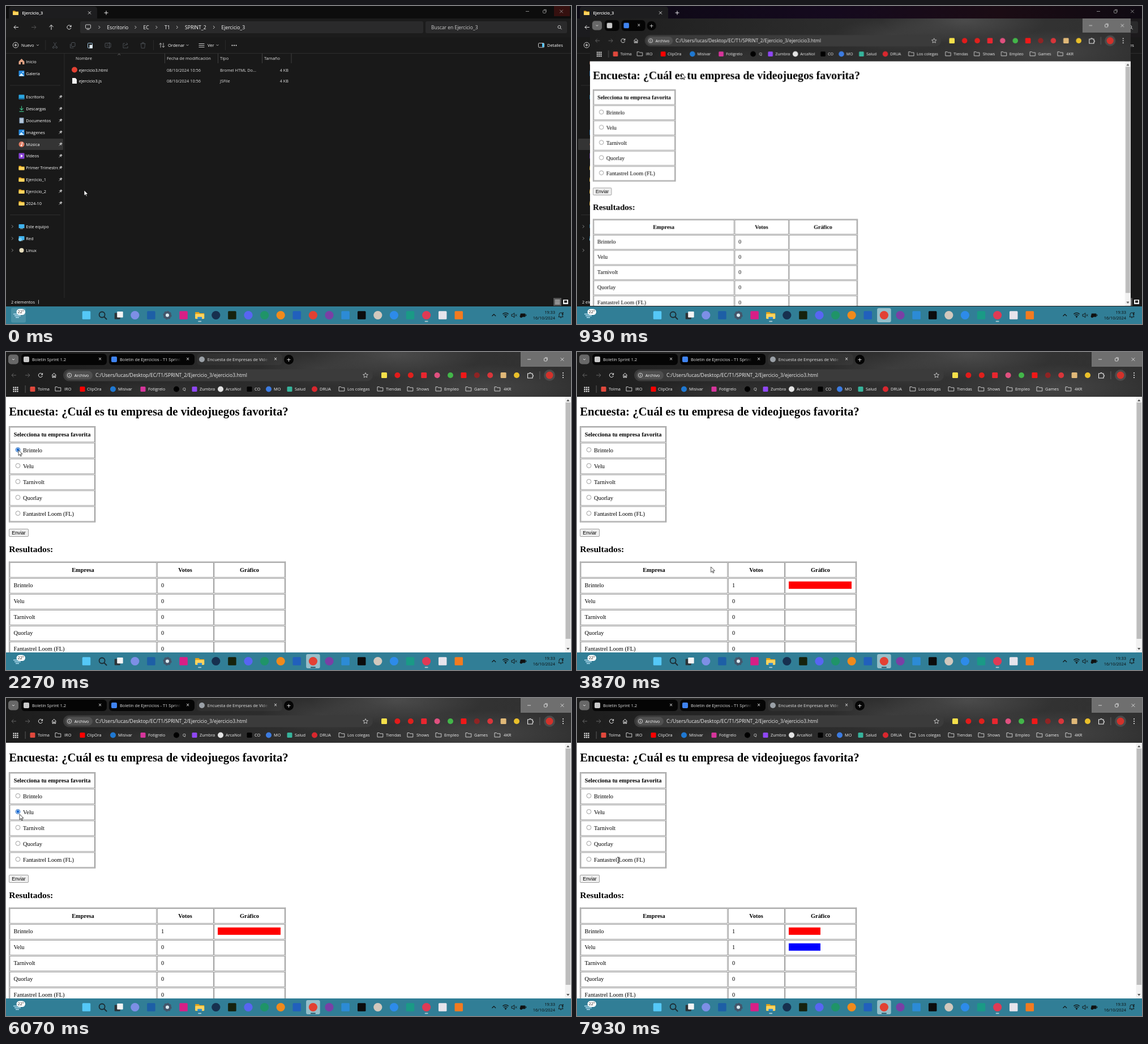
An HTML page that plays this animation: 998x561 px, repeating every 8 s.

```html
<!DOCTYPE html>
<html lang="es">
<head>
<meta charset="utf-8">
<title>Encuesta</title>
<style>
html, body { margin: 0; width: 100%; height: 100%; overflow: hidden; background: #191919; }
body { position: relative; font-family: "Open Sans", "Noto Sans", sans-serif; }
svg, #win, #strip { position: absolute; left: 0; top: 0; }
svg { width: 998px; height: 561px; overflow: hidden; white-space: pre; }
.serif { font-family: "Liberation Serif", "Times New Roman", serif; }
.arial { font-family: "Liberation Sans", Arial, sans-serif; }

#win {
  width: 998px; height: 530px; overflow: hidden; transform-origin: 0 0;
  background:
    radial-gradient(ellipse 150px 42px at 690px 4px, #5a5a5a99, #0000),
    radial-gradient(ellipse 170px 40px at 850px 62px, #55555588, #0000),
    radial-gradient(ellipse 110px 30px at 560px 30px, #4a4a4a88, #0000),
    radial-gradient(ellipse 160px 30px at 260px 72px, #40404077, #0000),
    linear-gradient(90deg, #1d1d1d, #292929 35%, #343434 70%, #303030);
  animation: open 8s linear infinite;
}
#strip { left: 27px; top: 3px; height: 20px; display: flex; color: #e3e3e3; font-size: 7.5px; line-height: 20px; }
.tab { position: relative; width: 155px; height: 20px; overflow: hidden; white-space: nowrap; animation: 8s linear infinite; }
.tab::before { content: ""; position: absolute; inset: 0 4px 0 0; border-radius: 6px; background: #050505; }
.tab:nth-child(3)::before { background: #ffffff08; }
.tab i { position: absolute; left: 4px; top: 5px; width: 10px; height: 10px; border-radius: 2px; }
.tab span { position: absolute; left: 19px; width: 108px; overflow: hidden; -webkit-mask: linear-gradient(90deg, #000 88%, #0000); }
.tab b { position: absolute; right: 13px; font: 10px/19px "Open Sans", sans-serif; }
.tab:nth-child(1) { animation-name: tab1; }
.tab:nth-child(2) { animation-name: tab2; }
.tab:nth-child(3) { animation-name: tab3; }
.tab span, .tab:nth-child(1) b { animation: label 8s linear infinite; }
.plus { width: 17px; height: 17px; margin: 1.5px 0 0 -1px; border-radius: 9px; background: #050505; text-align: center; font: 13px/16px "Open Sans", sans-serif; }

.step { animation: 8s step-end infinite; }
.hov { animation-name: hov; } .sel { animation-name: sel; } .idle { animation-name: idle; }
.focus1 { animation-name: focus1; } .focus2 { animation-name: focus2; } .line2 { animation-name: line2; }
.pick1 { animation-name: pick1; } .pick2 { animation-name: pick2; }
.on1 { animation-name: on1; } .off1 { animation-name: off1; }
.on2 { animation-name: on2; } .off2 { animation-name: off2; }
.press { animation-name: press; } .half { animation-name: half; }
.arrow { animation-name: arrow; } .beam { animation-name: beam; }
.fade { animation: fade 8s linear infinite; }
#ptr { animation: move 8s linear infinite; }

@keyframes fade { 0%, .9% { opacity: 1 } 4.5%, 100% { opacity: 0 } }
@keyframes hov { 0% { opacity: 0 } 5.5%, 100% { opacity: 1 } }
@keyframes sel { 0% { opacity: 0 } 8.3%, 100% { opacity: 1 } }
@keyframes idle { 0% { opacity: 1 } 8.3%, 100% { opacity: 0 } }
@keyframes focus1 { 0% { opacity: 0 } 8.3% { opacity: 1 } 11.56%, 100% { opacity: 0 } }
@keyframes focus2 { 0% { opacity: 0 } 11.56%, 100% { opacity: 1 } }
@keyframes line2 { 0% { opacity: 0 } 19.1%, 100% { opacity: 1 } }
@keyframes pick1 { 0% { opacity: 0 } 27.4% { opacity: 1 } 37.4%, 100% { opacity: 0 } }
@keyframes pick2 { 0% { opacity: 0 } 74.1% { opacity: 1 } 82%, 100% { opacity: 0 } }
@keyframes on1 { 0% { opacity: 0 } 37.4%, 100% { opacity: 1 } }
@keyframes off1 { 0% { opacity: 1 } 37.4%, 100% { opacity: 0 } }
@keyframes on2 { 0% { opacity: 0 } 82%, 100% { opacity: 1 } }
@keyframes off2 { 0% { opacity: 1 } 82%, 100% { opacity: 0 } }
@keyframes half { 0% { width: 111px } 82%, 100% { width: 56px } }
@keyframes press { 0% { opacity: 0 } 35.8% { opacity: 1 } 43.2% { opacity: 0 } 80.8% { opacity: 1 } 83.6%, 100% { opacity: 0 } }
@keyframes arrow { 0% { opacity: 1 } 98.2%, 100% { opacity: 0 } }
@keyframes beam { 0% { opacity: 0 } 98.2%, 100% { opacity: 1 } }
@keyframes open {
  0%, 11.55% { opacity: 0; transform: translate(23px, 22px) scale(.957) }
  11.56%, 12.2% { opacity: 1; transform: translate(23px, 22px) scale(.957) }
  13% { transform: translate(7px, 6.7px) scale(.987) }
  14.1%, 100% { opacity: 1; transform: translate(0, 0) scale(1) }
}
@keyframes tab1 { 0%, 12.2% { width: 31px } 15%, 100% { width: 155px } }
@keyframes tab2 { 0%, 12.2% { width: 48px } 15%, 100% { width: 155px } }
@keyframes tab3 { 0%, 12.2% { width: 0 } 15%, 100% { width: 155px } }
@keyframes label { 0%, 12.2% { opacity: 0 } 14%, 100% { opacity: 1 } }
@keyframes move {
  0%, .875% { transform: translate(138px, 325px) }
  5.8%, 12.5% { transform: translate(185px, 119px) }
  18.3% { transform: translate(62px, 190px) }
  23.7% { transform: translate(24px, 178px) }
  26.6%, 30% { transform: translate(22px, 173px) }
  36.3%, 40% { transform: translate(20px, 317px) }
  41.6%, 42.6% { transform: translate(40px, 318px) }
  48.3%, 48.6% { transform: translate(236.5px, 379px) }
  53.4% { transform: translate(290px, 420px) }
  58.7% { transform: translate(294px, 398px) }
  64.1% { transform: translate(253px, 364px) }
  73.7%, 76.6% { transform: translate(24px, 205px) }
  81.2%, 83% { transform: translate(26px, 318px) }
  85.9% { transform: translate(160px, 320px) }
  91.2% { transform: translate(294px, 444px) }
  96.6% { transform: translate(162px, 321px) }
  99.1%, 100% { transform: translate(73px, 286px) }
}
</style>
</head>
<body>
<svg id="desk"></svg>
<div id="win">
  <svg id="page"></svg>
  <div id="strip">
    <div class="tab"><i style="background:#c9c9c9"></i><span>Boletín Sprint 1.2</span><b>×</b></div>
    <div class="tab"><i style="background:#3f83f0"></i><span>Boletín de Ejercicios - T1 Sprint 1</span><b>×</b></div>
    <div class="tab"><i style="background:#9aa0a6;border-radius:5px"></i><span>Encuesta de Empresas de Videojuegos</span><b>×</b></div>
    <div class="plus">+</div>
  </div>
</div>
<svg id="bar"></svg>
<svg id="top"><g id="ptr">
  <path class="step arrow" d="M0 0V9.6L2.3 7.5L3.8 11L5.3 10.4L3.8 7H7Z" fill="#fff" stroke="#000" stroke-width=".7"/>
  <path class="step beam" d="M-2-5H-.6L0-4.4L.6-5H2M0-4.4V4.4M-2 5H-.6L0 4.4L.6 5H2" fill="none" stroke="#000" stroke-width="1"/>
</g></svg>
<script>
// y is the optical middle of the line
const text = (x, y, s, size = 7.5, fill = '#fff', attr = '') =>
  `<text x="${x}" y="${y + size * .35}" font-size="${size}" fill="${fill}" ${attr}>${s}</text>`;
const box = (x, y, w, h, fill, attr = '') =>
  `<rect x="${x}" y="${y}" width="${w}" height="${h}" fill="${fill}" ${attr}/>`;
const disc = (x, y, r, fill, attr = '') => `<circle cx="${x}" cy="${y}" r="${r}" fill="${fill}" ${attr}/>`;
const line = (d, stroke = '#fff', w = .9) => `<path d="${d}" fill="none" stroke="${stroke}" stroke-width="${w}"/>`;
const step = (name, body) => `<g class="step ${name}">${body}</g>`;
const at = (x, y, body) => `<g transform="translate(${x} ${y})">${body}</g>`;
const square = (x, y, s, fill, attr = 'rx="1.5"') => box(x - s / 2, y - s / 2, s, s, fill, attr);
const put = (id, parts) => document.getElementById(id).innerHTML = parts.join('');
const MID = 'text-anchor="middle"', END = 'text-anchor="end"', BOLD = 'font-weight="bold"';

const folder = (x, y, k = 1) => at(x, y, `<g transform="scale(${k})">` +
  `<path d="M-5-3.5H-1L0-2.2H5V3.8H-5Z" fill="#e3a21a"/>` + box(-5, -1.4, 10, 5.4, '#ffd45e', 'rx=".8"') + '</g>');
const chevron = (x, y, c = '#ddd') => line(`M${x - 1.5} ${y - 2.5}l2.5 2.5l-2.5 2.5`, c);
const down = (x, y, c = '#ccc') => line(`M${x - 2} ${y - 1}l2 2l2-2`, c, .8);
const cross = (x, y, r, c = '#fff') => line(`M${x - r} ${y - r}l${2 * r} ${2 * r}m0 ${-2 * r}l${-2 * r} ${2 * r}`, c, .8);
const arrowH = (x, y, dir, c = '#fff') => line(`M${x - 4 * dir} ${y}h${8 * dir}m${-3.4 * dir}-3.4l${3.4 * dir} 3.4l${-3.4 * dir} 3.4`, c);
const reload = (x, y) => line(`M${x + 3.4} ${y - 1}a3.6 3.6 0 1 0 0 2M${x + 3.6} ${y - 3.8}v2.8h-2.8`);
const lens = (x, y, r, c, w) => disc(x, y, r, 'none', `stroke="${c}" stroke-width="${w}"`) +
  line(`M${x + r * .7} ${y + r * .7}l${r} ${r}`, c, w);
const winButtons = (xs, y, c) => line(`M${xs[0] - 3} ${y}h6`, c, .8) +
  box(xs[1] - 2.5, y - 2, 5, 5, 'none', `rx="1" stroke="${c}" stroke-width=".8"`) +
  line(`M${xs[1] - 1} ${y - 3.2}h4.2v4.4`, c, .7) + cross(xs[2], y, 2.8, c);

// file manager
const tools = c => [
  line('M84 64l5 8M89 64l-5 8', c), disc(83.8, 73, 1.5, 'none', `stroke="${c}"`), disc(89.2, 73, 1.5, 'none', `stroke="${c}"`),
  box(115.5, 64.5, 6.5, 7, 'none', `rx="1.2" stroke="${c}"`), line('M113.5 67v7h6', c),
  box(144.5, 65.5, 8, 8.5, 'none', `rx="1" stroke="${c}"`), box(147.5, 68.5, 5.5, 6, c, 'rx=".6"'),
  box(175, 65.5, 10, 7.5, 'none', `rx="1" stroke="${c}"`), text(177, 69.2, 'A', 6, c), line('M182.5 64v11', c),
  line('M210 66h-3v8h8v-3M209 71q1-4 6-4m-2.4-2.4l2.4 2.4l-2.4 2.4', c),
  line('M237.5 66.5h9M240.5 66v-1.6h3V66M238.5 67l.7 7.3h5.6l.7-7.3', c)
].join('');

const places = [
  ['Inicio', 98], ['Galería', 119], ['Escritorio', 160.5], ['Descargas', 181.5], ['Documentos', 202], ['Imágenes', 223],
  ['Música', 244], ['Vídeos', 264.5], ['Primer Trimestre', 285.5], ['Ejercicio_1', 306], ['Ejercicio_2', 327],
  ['2024-10', 348], ['Este equipo', 389], ['Red', 410], ['Linux', 431]
];
const photo = y => box(22.5, y - 5, 10, 10, '#2689dd', 'rx="1"') + `<path d="M23 ${y + 4.5}l4-5l5 5Z" fill="#d9efff"/>` + disc(30, y - 2, 1, '#fff');
const screen = y => box(22.5, y - 4, 10, 7, '#3fb2ee', 'rx=".8"') + box(25, y + 3.4, 5, 1, '#9bb');
const placeIcon = (i, y) => [
  () => `<path d="M22.5 ${y}l5-5l5 5v5h-3.5v-4h-3v4H22.5Z" fill="#e2a283"/>`,
  () => photo(y),
  () => box(22.5, y - 4, 10, 8, '#2aa5e0', 'rx="1"') + box(22.5, y + 2, 10, 2, '#176a9c'),
  () => line(`M27.5 ${y - 5}v7m-3-3l3 3l3-3M23.5 ${y + 4.6}h8`, '#3fc48c', 1.1),
  () => box(23.5, y - 5, 8, 10, '#8fa9c4', 'rx="1"') + line(`M25 ${y - 2}h5m-5 2.2h5m-5 2.2h5`, '#fff', .8),
  () => photo(y),
  () => disc(27.5, y, 5, '#df7b62') + line(`M28 ${y + 2}v-5l2 1`, '#fff') + disc(27, y + 2, 1.2, '#fff'),
  () => box(22.5, y - 5, 10, 10, '#8b45d8', 'rx="1"') + `<path d="M26 ${y - 2.4}l4 2.4l-4 2.4Z" fill="#fff"/>`,
  ...Array(4).fill(() => folder(27.5, y)),
  () => screen(y),
  () => screen(y) + disc(25, y + 2, 3, '#7fd0f5'),
  () => disc(27.5, y, 4, '#e6dcbc')
][i]();
const pin = y => at(96, y, '<g transform="rotate(45)">' + box(-1.6, -3.4, 3.2, 3.4, '#b5b5b5') + line('M-2.6.2h5.2M0 0v3.6', '#b5b5b5', .9) + '</g>');

put('desk', [
  '<defs><linearGradient id="tint"><stop stop-color="#0c0914"/><stop offset=".45" stop-color="#150a1e"/><stop offset=".75" stop-color="#1b0c14"/><stop offset="1" stop-color="#0f0a12"/></linearGradient>',
  '<linearGradient id="nav"><stop stop-color="#1b1b1e"/><stop offset=".6" stop-color="#1e1a20"/><stop offset="1" stop-color="#1c1a1c"/></linearGradient>',
  '<clipPath id="cut"><path d="M0 84H91.5V515H0Z"/></clipPath></defs>',
  box(0, 0, 998, 530, '#191919'), box(0, 0, 998, 22, '#0d0d0d'), box(0, 22, 998, 33, '#1c1c1c'),
  step('sel', box(0, 0, 998, 22, 'url(#tint)') + box(0, 22, 998, 33, 'url(#nav)')),
  `<g class="fade">${box(968, 0, 28, 18, '#35100f')}</g>`,
  '<path d="M5 22V6Q5 1 10 1H156Q161 1 161 6V22Z" fill="#1d1d1f"/>',
  folder(17, 12), text(28.5, 12, 'Ejercicio_3', 7.4, '#fff', 'font-weight="600"'), cross(147.5, 12, 2.5), line('M173.5 12h7m-3.5-3.5v7'),
  winButtons([921, 951, 981], 9.5, '#a5a5a5'),
  box(131, 27, 606, 21, '#2a2a2b', 'rx="2.5"'), box(741, 27, 250, 21, '#2a2a2b', 'rx="2.5"'),
  arrowH(18, 37.5, -1), arrowH(49, 37.5, 1, '#5a5a5a'),
  line('M80 42v-8.5m-3.6 3.6l3.6-3.6l3.6 3.6'), reload(111.5, 37.5),
  box(140.5, 33, 9, 6.5, 'none', 'rx="1" stroke="#ddd" stroke-width=".9"'), line('M142.5 41.5h5', '#ddd'),
  ...[165, 229, 266, 302.5, 367.5].map(x => chevron(x, 37.5)),
  ...[[178.5, 'Escritorio'], [242.5, 'EC'], [280, 'T1'], [316, 'SPRINT_2'], [380.5, 'Ejercicio_3']].map(([x, s]) => text(x, 37.5, s, 8.6)),
  text(751, 38, 'Buscar en Ejercicio_3', 8.5, '#d0d0d0'), lens(977.3, 37, 2.5, '#ddd', .9),
  box(0, 83, 998, .8, '#333'),
  disc(17, 69, 4.8, 'none', 'stroke="#ddd" stroke-width=".9"'), line('M14.5 69h5m-2.5-2.5v5'),
  text(27, 69.2, 'Nuevo', 7.5), down(56, 69), box(69.5, 60, .7, 18, '#333'), box(260, 60, .7, 18, '#333'), box(387, 60, .7, 18, '#333'),
  step('idle', tools('#4e5358') + `<g>${box(144.5, 65.5, 8, 8.5, '#191919', 'rx="1" stroke="#9cc3de"')}${box(147.5, 68.5, 5.5, 6, '#dfe9f0')}</g>`),
  step('sel', tools('#b9cbd8')),
  line('M273 73.5v-8m-2.4 2.4l2.4-2.4l2.4 2.4M278 65v8m-2.4-2.4l2.4 2.4l2.4-2.4', '#ddd', .8),
  text(286, 69.2, 'Ordenar', 7.5), down(320.5, 69), line('M340.5 66.5h10m-10 3h10m-10 3h10', '#ddd'), text(356, 69.2, 'Ver', 7.5), down(373.5, 69),
  ...[399.5, 403, 406.5].map(x => disc(x, 69.5, 1, '#fff')),
  box(940.5, 65.5, 10, 7.5, 'none', 'rx="1.2" stroke="#ddd" stroke-width=".9"'), box(947, 66, 3.3, 6.5, '#4cc2ff'), text(956, 69.2, 'Detalles', 7.4),
  box(102.6, 84, .8, 431, '#303030'), box(7, 139.6, 89, .8, '#333'), box(7, 368, 89, .8, '#333'),
  box(2, 234, 99, 20, '#343434', 'rx="1.5"'),
  `<g clip-path="url(#cut)">${places.map(([s, y]) => text(35.3, y + .3, s, 7.4)).join('')}</g>`,
  ...places.map(([, y], i) => placeIcon(i, y) + (i > 1 && i < 12 ? pin(y) : '') + (i > 11 ? chevron(11.5, y, '#999') : '')),
  ...[280, 374, 452, 503.6].map(x => box(x, 84, .8, 17, '#4a4a4a')), line('M197.5 86.5l2.3-2l2.3 2', '#999', .7),
  ...[[123, 'Nombre'], [284, 'Fecha de modificación'], [378, 'Tipo'], [456, 'Tamaño']].map(([x, s]) => text(x, 92.5, s, 7.5, '#dedede')),
  step('hov', box(114, 105, 388, 16, '#363636')),
  disc(121, 112.5, 5, '#e34133'), '<path d="M117 127h5.5l2.5 2.5v7.5h-8Z" fill="#f2f2f2"/>',
  ...[['ejercicio3.html', 'Bromel HTML Do...', 113], ['ejercicio3.js', 'JSFile', 132]].map(([n, k, y]) =>
    text(128.7, y, n, 7.5) + text(284, y, '08/10/2024 10:56', 7.4, '#dedede') + text(378, y, k, 7.3, '#dedede') + text(499, y, '4 KB', 7.3, '#dedede', END)),
  text(9, 522.5, '2 elementos', 7.3), box(57, 518.5, .8, 7, '#ddd'),
  step('sel', text(64, 522.5, '1 elemento seleccionado  3,27 KB', 7.3) + box(186, 518.5, .8, 7, '#ddd')),
  box(967, 515, 14, 14, '#555'), line('M969.5 518.8h9m-9 2.3h9m-9 2.3h9m-9 2.3h9', '#eee', .9), box(984, 518, 9, 8, '#eee'), box(986, 519.5, 5, 4, '#222')
]);

// browser page
const makers = ['Brintelo', 'Velu', 'Tarnivolt', 'Quorlay', 'Fantastrel Loom (FL)'];
const frame = (x, y, w, h) => box(x, y, w, h, 'none', 'stroke="#747474" stroke-width=".75"');
const rows = [0, 1, 2, 3, 4, 5];
const serif = body => `<g class="serif">${body}</g>`;
const radio = y => disc(21, y, 3.9, '#fff', 'stroke="#767676" stroke-width=".7"');
const picked = y => disc(21, y, 3.8, '#fff', 'stroke="#0a62cf" stroke-width=".9"') + disc(21, y, 2.4, '#0a62cf');
const button = (fill, edge) => box(5.4, 312.3, 34.2, 13.2, fill, `rx="1.6" stroke="${edge}" stroke-width=".7"`);

const marks = [
  [47, '#e0483c', 56, 'Tolma'], [92, 0, 103, 'IRO'], [135, '#f00', 143, 'ClipOra'], [189, '#1f78d1', 198, 'Misivar'],
  [242, '#d6359b', 251, 'Fotigrelo'], [301, '#000', 312, 'Q'], [333, '#8f47f5', 342, 'Zumbra'], [379, '#e4e4e4', 388, 'ArcaNol'],
  [430, '#000', 439, 'CO'], [464, '#3c7be0', 473, 'MO'], [501, '#36b39b', 510, 'Salud'], [545, '#d9272e', 554, 'DRUA'],
  [593, 0, 603, 'Los colegas'], [661, 0, 671, 'Tiendas'], [714, 0, 725, 'Shows'], [764, 0, 774, 'Empleo'], [817, 0, 827, 'Games'], [868, 0, 879, '4KR']
];
const outline = x => line(`M${x - 5} 61.5h3.6l1.2 1.4h5v6h-9.8Z`, '#ddd');
const addons = ['#f5e04a', '#e21b1b', '#e0201c', '#e8262f', '#e0507f', '#43b649', '#f01818', '#8f2424', '#d8353a', '#e0b878', '#e9bf2a'];

put('page', [
  '<path d="M909 0H998V26H909Z" fill="#fff" opacity=".3"/>', winButtons([924, 953, 982.5], 13, '#eee'),
  box(4, 4.5, 18, 17, '#686868', 'rx="5"'), down(13, 13, '#fff'),
  arrowH(14, 41, -1, '#6b6b6b'), arrowH(38, 41, 1, '#6b6b6b'), reload(61, 41), line('M81 41l3.8-3.6l3.8 3.6M82 40.5v4.5h2v-3h1.6v3h2v-4.5'),
  box(101, 30.5, 547, 21, '#3b3b3b', 'rx="10.5"'), box(105, 33.5, 48, 15, '#505050', 'rx="7.5"'),
  disc(112, 41, 3.7, 'none', 'stroke="#eee" stroke-width=".8"'), line('M112 40.4v2.6M112 38.7v.9', '#eee'),
  text(120.7, 41.2, 'Archivo', 7.4), text(158, 41.2, 'C:/Users/lucas/Desktop/EC/T1/SPRINT_2/Ejercicio_3/ejercicio3.html', 8.65, '#f0f0f0'),
  line('M635 36.6l1.3 2.9l3.1.3l-2.4 2.1l.7 3.1l-2.7-1.6l-2.7 1.6l.7-3.1l-2.4-2.1l3.1-.3Z', '#ddd', .8),
  ...addons.map((c, i) => i % 3 ? disc(668 + i * 23.4, 41, 5, c) : square(668 + i * 23.4, 41, 10, c)),
  line('M921.5 38h3a1.4 1.4 0 0 1 2.8 0h2.7v2.6a1.4 1.4 0 0 1 0 2.8v2.6h-8.5Z', '#eee', 1.1), box(942.5, 34, .8, 14, '#666'),
  disc(960, 41, 10, '#4b4b4b'), disc(960, 41, 6.5, '#d2322b'), ...[37, 41, 45].map(y => disc(984, y, 1, '#eee')),
  ...[0, 1, 2, 3, 4, 5, 6, 7, 8].map(i => box(12.5 + i % 3 * 3.4, 61.5 + (i / 3 | 0) * 3.4, 2.2, 2.2, '#eee')), box(33.7, 59, .8, 13, '#666'),
  ...marks.map(([x, c, tx, s], i) => (!c ? outline(x) : i % 2 ? disc(x, 65.5, 5, c) : square(x, 65.5, 9, c)) + text(tx, 65.5, s, 7.4, '#f0f0f0')),

  box(0, 79, 998, 451, '#fff'), box(987.6, 79, 10.4, 451, '#f1f1f1'), box(988.5, 89, 8.6, 417, '#bdbdbd'),
  '<path d="M990 87l2.7-3.4l2.7 3.4ZM990 522l2.7 3.4l2.7-3.4Z" fill="#555"/>',
  serif(text(5.2, 105, 'Encuesta: ¿Cuál es tu empresa de videojuegos favorita?', 20.8, '#000', BOLD) +
    text(5.2, 348, 'Resultados:', 15.6, '#000', BOLD) +
    text(81.5, 145.5, 'Selecciona tu empresa favorita', 10.4, '#000', BOLD + MID.padStart(22)) +
    [['Empresa', 136], ['Votos', 316.5], ['Gráfico', 430]].map(([s, x]) => text(x, 384, s, 10.4, '#000', BOLD + ' ' + MID)).join('') +
    makers.map((s, i) => text(30, 173.5 + 28 * i, s, 10.4, '#000') + text(13.5, 411.8 + 28 * i, s, 10.4, '#000')).join('') +
    makers.map((s, i) => {
      const n = v => text(274, 411.8 + 28 * i, v, 10.4, '#000');
      return i < 2 ? step('off' + (i + 1), n(0)) + step('on' + (i + 1), n(1)) : n(0);
    }).join('')),
  frame(5.4, 131.3, 152.4, 168.8), frame(5.4, 370, 488.4, 170),
  ...rows.map(i => frame(7, 132.8 + 28 * i, 149.4, 26)),
  ...rows.map(i => [[7, 258.8], [267.3, 99.2], [367.9, 124.4]].map(([x, w]) => frame(x, 371.4 + 28 * i, w, 26)).join('')),
  ...makers.map((s, i) => radio(172.5 + 28 * i)),
  step('pick1', picked(172.5)), step('pick2', picked(200.5)),
  button('#efefef', '#767676'), step('press', button('#e3e3e3', '#4f4f4f')),
  `<g class="arial">${text(22.5, 318.8, 'Enviar', 8.67, '#000', MID)}</g>`,
  step('on1', box(374, 404.8, 111, 13, '#f00', 'class="step half"')),
  step('on2', box(374, 432.8, 56, 13, '#00f'))
]);

// taskbar: one plain mark per slot
const apps = {
  0: 's#55c8f7', 3: 'c#7d8fe6', 4: 's#1d5fa6', 6: 's#d81f86', 8: 'c#17304f', 9: 's#16220d', 10: 'c#5865f2', 11: 'c#1f9468',
  12: 'c#f08a1c', 13: 's#2160bd', 14: 'c#e34133', 15: 'c#7a3fa5', 16: 's#2c8bd6', 17: 's#0c0c0c', 18: 'c#d2c8bd', 19: 'c#2d8bea',
  20: 's#1a9a86', 21: 'c#e03a55', 22: 's#e6e4ec', 23: 's#f37b20'
};
const slot = i => 142 + 28.6 * i;
const glow = i => box(slot(i) - 12.3, 533, 24.6, 25, '#d5e6ea', 'rx="3" opacity=".62"');
const dash = (i, w, c) => box(slot(i) - w / 2, 555.6, w, 1.6, c, 'rx=".8"');

put('bar', [
  box(0, 530, 998, 31, '#317e96'),
  `<g class="fade">${box(9, 532.5, 26, 26, '#4b91a6', 'rx="3"')}</g>`,
  line('M13 543.5h9m-7 3h11m-9 3h6', '#b9e2f5', 1.3), box(18.5, 534.5, 15.5, 10.5, '#fff', 'rx="5.2"'), text(26.3, 539.8, '22°', 7, '#222', MID),
  step('focus1', glow(7)), step('focus2', glow(14)),
  dash(7, 6, '#b5cdd4'), dash(21, 6, '#b5cdd4'), step('focus1', dash(7, 9, '#174a5c')), step('line2', dash(14, 9, '#174a5c')),
  ...Object.entries(apps).map(([i, a]) => a[0] === 'c' ? disc(slot(i), 545.5, 7.6, a.slice(1)) : square(slot(i), 545.5, 14.5, a.slice(1))),
  lens(slot(1) - 1, 544.5, 5, '#1c2b33', 1.8), box(slot(2) - 7.5, 541.5, 10, 11, '#2b3338', 'rx="1"'), box(slot(2) - 3, 539, 10.5, 10.5, '#f4f4f4', 'rx="1"'),
  disc(slot(5), 545.5, 5, 'none', 'stroke="#44566b" stroke-width="4"'), disc(slot(5), 545.5, 6.7, 'none', 'stroke="#44566b" stroke-width="2" stroke-dasharray="2.6"'), disc(slot(5), 545.5, 3, '#dfe9ef'),
  folder(slot(7), 545.5, 1.6), box(slot(7) - 4, 548.5, 8, 3.5, '#2d8bd8', 'rx="1"'),
  line('M858.5 547l3.3-3.2l3.3 3.2', '#111', 1.1),
  line('M877.3 543.5q5.2-4.4 10.4 0M879 545.7q3.5-2.8 7 0M880.8 547.7q1.7-1.2 3.4 0', '#111', 1.2), disc(882.5, 549, 1, '#111'),
  '<path d="M893 544h2l2.8-2.4v8L895 547.300h-2Z" fill="none" stroke="#111" stroke-width=".9"/>', cross(901, 545.6, 1.6, '#111'),
  box(908.5, 542.5, 9, 6, '#111', 'rx="1.2"'), box(918, 544.2, 1.2, 2.6, '#111'), disc(910, 547.5, 2.4, '#111'),
  text(970, 540.3, '19:33', 7.4, '#0c0c0c', END), text(970, 550.5, '16/10/2024', 7.4, '#0c0c0c', END),
  line('M976 548.5h8l-1-2v-2.500a3 3 0 0 0-6 0v2.500ZM979 550h2M982 541h3l-3 3h3', '#111', .9)
]);
</script>
</body>
</html>
```
